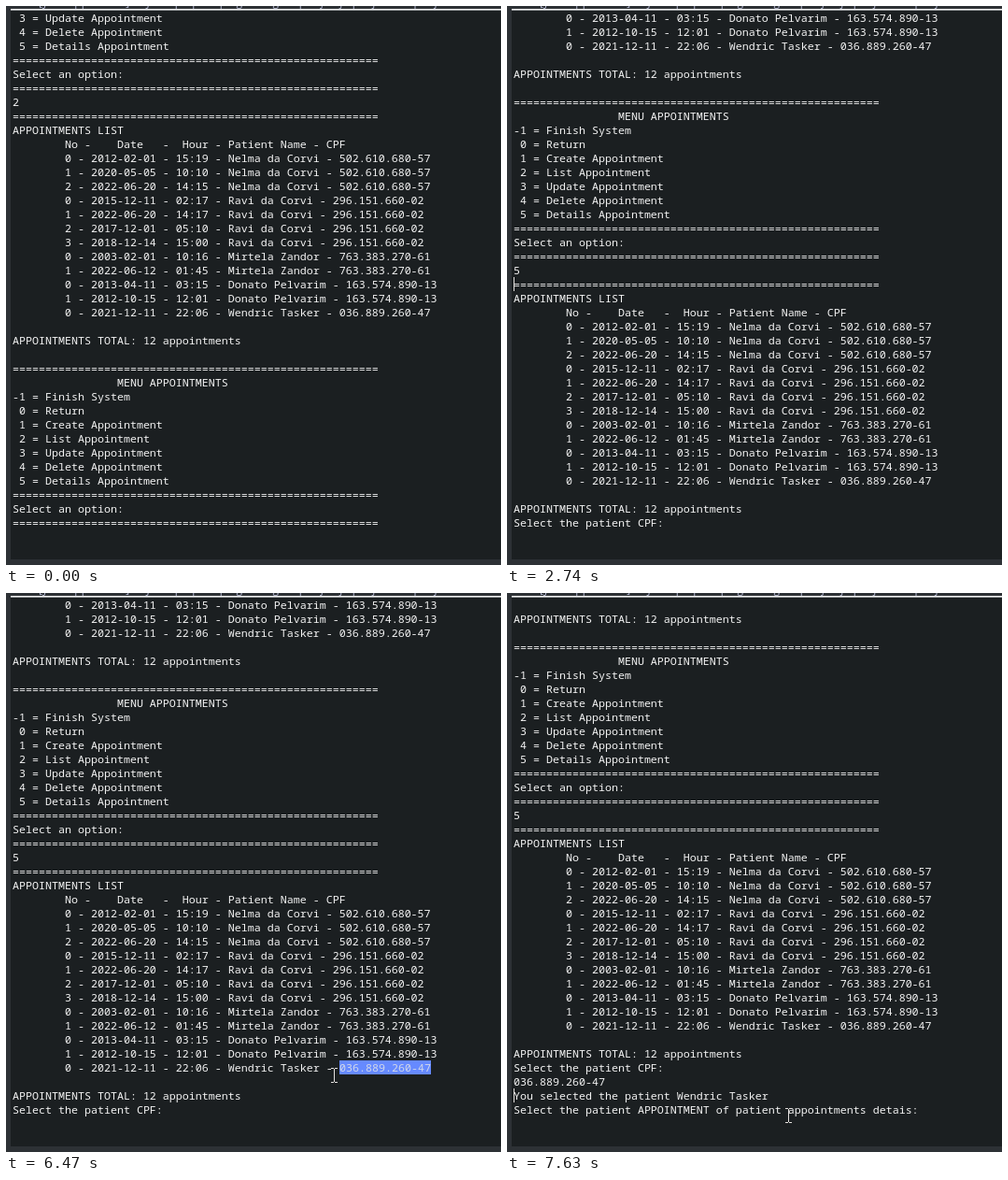
Recreate the animation shown at these times as an HTML page. Size 530 px wide and 598 px high, loop 8000 ms.

```html
<!DOCTYPE html>
<html lang="en">
<head>
<meta charset="utf-8">
<title>Appointments console</title>
<style>
  html, body { margin: 0; width: 100%; height: 100%; overflow: hidden; background: #1b1f21; }
  svg { display: block; width: 530px; height: 598px; }
  text { white-space: pre; }
  .mono { font: 11.667px "Noto Sans Mono", "DejaVu Sans Mono", monospace; fill: #f4f4f4; }
  .title { font: 12px "Open Sans", "Noto Sans", sans-serif; fill: #b9bdd6; }
  #selected { fill: #d2d8e8; }
</style>
</head>
<body>
<svg viewBox="0 0 530 598">
  <defs>
    <clipPath id="view"><rect x="5" y="5" width="525" height="587"/></clipPath>
    <clipPath id="bar"><rect width="530" height="3"/></clipPath>
  </defs>
  <rect width="530" height="598" fill="#2d3135"/>
  <g clip-path="url(#bar)">
    <text class="title" x="35" y="0">[Java Application] C:\Java\.p2\pool\plugins\org.eclipse.justj.openjdk.hotspot.jre.full.win32.x86_64\jre\bin</text>
  </g>
  <rect x="5" y="5" width="525" height="587" fill="#1b1f21"/>
  <rect x="5" y="3" width="525" height="1" fill="#f0f0f0"/>
  <rect x="5" y="4" width="525" height="1" fill="#a4a7a9"/>
  <g clip-path="url(#view)">
    <g id="page">
      <g id="lines"></g>
      <rect id="selection" height="15" fill="#668aff"/>
      <text id="selected" class="mono"></text>
      <rect id="caret" width="1" height="15" fill="#e4e0de"/>
    </g>
  </g>
  <path id="mouse" d="M0 .5H3M4 .5H7M3.5 1V15M0 15.5H3M4 15.5H7" fill="none" stroke="#e4e0de"/>
</svg>
<script>
const LOOP = 8000, LEFT = 7, CELL = 7, ROW = 15, TOP = 5, BASE = 12;
const LOWEST_CARET = 571, BLINK = 520, TICK = 143, TICK_PHASE = 30;
const $ = id => document.getElementById(id);

const indent = n => " ".repeat(n);
const rule = "=".repeat(56);
const patients = [
  ["Nelma da Corvi", "502.610.680-57", ["2012-02-01 - 15:19", "2020-05-05 - 10:10", "2022-06-20 - 14:15"]],
  ["Ravi da Corvi", "296.151.660-02", ["2015-12-11 - 02:17", "2022-06-20 - 14:17", "2017-12-01 - 05:10", "2018-12-14 - 15:00"]],
  ["Mirtela Zandor", "763.383.270-61", ["2003-02-01 - 10:16", "2022-06-12 - 01:45"]],
  ["Donato Pelvarim", "163.574.890-13", ["2013-04-11 - 03:15", "2012-10-15 - 12:01"]],
  ["Wendric Tasker", "036.889.260-47", ["2021-12-11 - 22:06"]]
];
const [lastName, lastCpf] = patients.at(-1);
const list = [
  rule, "APPOINTMENTS LIST",
  indent(8) + "No -    Date   -  Hour - Patient Name - CPF",
  ...patients.flatMap(([name, cpf, dates]) =>
    dates.map((date, i) => `${indent(8)}${i} - ${date} - ${name} - ${cpf}`)),
  "", "APPOINTMENTS TOTAL: 12 appointments"
];
const options = ["Return", "Create", "List", "Update", "Delete", "Details"]
  .map((verb, i) => ` ${i} = ${verb}${i ? " Appointment" : ""}`);
const prompt = [rule, "Select an option:", rule];

const menu = [
  ...options.slice(3), ...prompt, "2", ...list, "",
  rule, indent(16) + "MENU APPOINTMENTS", "-1 = Finish System", ...options, ...prompt
];
const details = [...menu, "5", ...list, "Select the patient CPF:"];
const lines = [
  ...details, lastCpf,
  `You selected the patient ${lastName}`,
  "Select the patient APPOINTMENT of patient appointments detais:"
];

// An "entered" line moves the caret to the row below the answer.
const afterMenu = menu.length + 1, afterDetails = details.length + 1;
const stages = [
  { from: -720, printed: menu.length },
  { from: 2460, printed: menu.length, typed: 1 },
  { from: 2590, printed: menu.length, typed: 1, entered: afterMenu },
  { from: 2740, printed: details.length, entered: afterMenu },
  { from: 6770, printed: details.length },
  { from: 7070, printed: details.length, typed: 1 },
  { from: 7500, printed: details.length, typed: 1, entered: afterDetails },
  { from: 7630, printed: lines.length, entered: afterDetails }
];

// Pointer key points: [tick, x, y]
const path = [
  [23, 354, 456], [24, 334, 454], [26, 334, 504], [30, 457, 498], [35, 455, 498],
  [42, 357, 495], [44, 357, 495], [45, 348, 508], [47, 298, 551]
];
const DRAG_START = 36, DRAG_END = 47;
const pickRow = details.length - 4, pickEnd = lines[pickRow].length;

const colX = col => LEFT + col * CELL;
const rowY = row => TOP + row * ROW;
const easeOut = p => 1 - (1 - p) ** 2;
const set = (el, attrs) => { for (const k in attrs) el.setAttribute(k, attrs[k]); };
const show = (el, on) => set(el, { visibility: on ? "visible" : "hidden" });

const rows = lines.map((line, i) => {
  const el = document.createElementNS("http://www.w3.org/2000/svg", "text");
  set(el, { class: "mono", x: LEFT, y: rowY(i) + BASE });
  el.textContent = line;
  return $("lines").appendChild(el);
});

function pointer(tick) {
  const i = path.findLastIndex(point => point[0] <= tick);
  if (i < 0) return null;
  const [t0, x0, y0] = path[i], [t1, x1, y1] = path[i + 1] || path[i];
  const p = t1 > t0 ? easeOut((tick - t0) / (t1 - t0)) : 0;
  return { x: Math.round(x0 + (x1 - x0) * p), y: Math.round(y0 + (y1 - y0) * p) };
}

function drawConsole(t, dragging) {
  const { from, printed, typed = 0, entered } = stages.findLast(s => s.from <= t);
  const count = printed + typed;
  const row = entered ?? count - 1;
  const col = entered ? 0 : lines[row].length;
  const scroll = Math.max((printed - menu.length) * ROW, rowY(row) - LOWEST_CARET);
  rows.forEach((el, i) => show(el, i < count));
  set($("page"), { transform: `translate(0 ${-scroll})` });
  set($("caret"), { x: colX(col), y: rowY(row) });
  show($("caret"), !dragging && Math.floor((t - from) / BLINK) % 2 === 0);
}

function drawSelection(mouseX, dragging) {
  const dragged = Math.round((colX(pickEnd) - mouseX - 3.5) / CELL);
  const count = dragging ? Math.min(lastCpf.length, dragged) : 0;
  const x = colX(pickEnd - count), y = rowY(pickRow);
  set($("selection"), { x, y, width: count * CELL });
  set($("selected"), { x, y: y + BASE });
  $("selected").textContent = lastCpf.slice(lastCpf.length - count);
}

function draw(t) {
  const tick = Math.floor((t - TICK_PHASE) / TICK);
  const dragging = tick >= DRAG_START && tick < DRAG_END;
  const mouse = pointer(tick);
  drawConsole(t, dragging);
  drawSelection(mouse?.x ?? 0, dragging);
  show($("mouse"), mouse);
  if (mouse) set($("mouse"), { transform: `translate(${mouse.x} ${mouse.y})` });
}

const start = performance.now();
function loop() {
  draw((performance.now() - start) % LOOP);
  requestAnimationFrame(loop);
}
loop();
</script>
</body>
</html>
```
